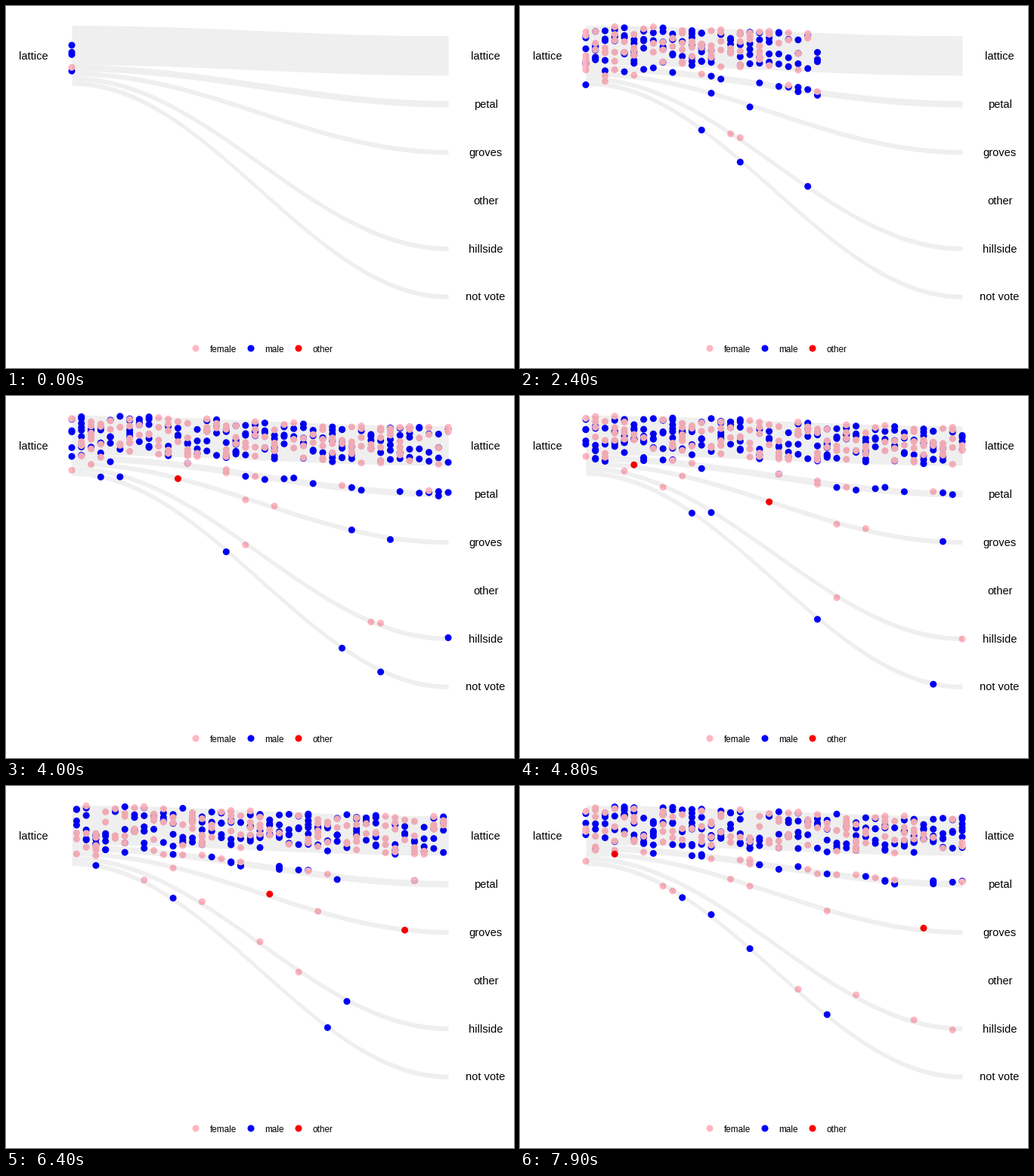
Recreate the animation shown at these times as a matplotlib script. Size 672x480 px, loop 8 s.

```python
import numpy as np
import matplotlib.pyplot as plt
from matplotlib.animation import FuncAnimation

W, H, DPI = 672, 480, 100
FRAMES, INTERVAL = 80, 100
X0, X1, STEPS = 87, 585, 39
PX = 72 / DPI
COLORS = {"m": "#0000ff", "f": "#ffb6c1", "o": "#ff0000"}

# stream: start centre, end centre, height
STREAMS = {
    "lattice": (51.8, 65.8, 52.3),
    "petal": (82.2, 129.7, 8.6),
    "groves": (89.6, 193.6, 6.3),
    "hillside": (96.0, 321.4, 6.3),
    "not vote": (102.4, 385.3, 6.3),
}
LABELS = ["lattice", "petal", "groves", "other", "hillside", "not vote"]

# rare voters: birth step, offset from the stream centre, group
RARE = {
    "groves": [(7, 2.7, "m"), (11, 0, "m"), (19, -2, "f"), (22, 2.4, "f"),
               (29, 0.9, "o"), (38, 0.5, "f"), (43, -2.5, "o"), (53, 1.8, "f"),
               (61, 1.7, "f"), (63, 0.4, "f"), (75, -0.8, "o")],
    "hillside": [(1, -0.9, "m"), (8, -2.9, "f"), (9, 0.8, "f"), (22, 2.4, "f"),
                 (35, 2.2, "m"), (40, 2.4, "f"), (44, -2.3, "f"), (50, -3, "f")],
    "not vote": [(8, 2.5, "m"), (12, 1, "m"), (24, 2.1, "m"), (37, 0.9, "m"),
                 (53, -1.4, "m"), (56, -2.7, "f"), (61, 0.1, "m"), (65, -2.6, "m"),
                 (68, 2.1, "m"), (69, 1.1, "f"), (70, 2.1, "f"), (78, -2.7, "f")],
}
FIRST = {
    "lattice": [(0, 0.2, "m"), (0, 9.6, "m"), (0, 12.6, "m")],
    "petal": [(0, -0.9, "f"), (0, 4, "m")],
}


def ease(u):
    return (1 - np.cos(np.pi * u)) / 2


def make_voters():
    rng = np.random.default_rng(11)
    voters = [(name, *v) for group in (FIRST, RARE)
              for name, vs in group.items() for v in vs]
    for birth in range(1, FRAMES):
        counts = {"lattice": rng.integers(5, 12), "petal": rng.poisson(1)}
        for name, count in counts.items():
            reach = STREAMS[name][2] / 2 - 0.3
            for offset in rng.uniform(-reach, reach, count):
                voters.append((name, birth, offset, rng.choice(["m", "f"], p=[0.58, 0.42])))
    return sorted(voters, key=lambda v: "mfo".index(v[3]))


voters = make_voters()
birth = np.array([v[1] for v in voters])
start = np.array([STREAMS[v[0]][0] + v[2] for v in voters])
drop = np.array([STREAMS[v[0]][1] - STREAMS[v[0]][0] for v in voters])
color = np.array([COLORS[v[3]] for v in voters])

plt.rcParams["font.family"] = "Liberation Sans"
fig = plt.figure(figsize=(W / DPI, H / DPI), dpi=DPI, facecolor="white")
ax = fig.add_axes([0, 0, 1, 1])
ax.set(xlim=(0, W), ylim=(H, 0))
ax.axis("off")

DOT = dict(s=(9 * PX) ** 2, linewidths=0)
dots = ax.scatter([], [], zorder=2, **DOT)

# translucent ribbons lie over the dots
u = np.linspace(0, 1, 200)
for y0, y1, height in STREAMS.values():
    mid = y0 + (y1 - y0) * ease(u)
    ax.fill_between(X0 + (X1 - X0) * u, mid - height / 2, mid + height / 2,
                    color="black", alpha=0.064, linewidth=0, zorder=3)


def label(x, y, text, size=14.65, ha="center"):
    ax.text(x, y, text, size=size * PX, ha=ha, va="baseline", color="black")


label(36.8, 71, LABELS[0])
for i, name in enumerate(LABELS):
    label(634.6, 71 + 63.9 * i, name)

KEY_X = [251, 324, 387]
ax.scatter(KEY_X, [454] * 3, c=[COLORS[k] for k in "fmo"], **DOT)
for x, name in zip(KEY_X, ["female", "male", "other"]):
    label(x + 18.6, 458.8, name, size=11.7, ha="left")


def clock(i):
    """Steps elapsed; the flow slows to half speed for two frames."""
    return min(i, max(63 + (i - 63) / 2, i - 1))


def update(i):
    age = clock(i) - birth
    on = (age >= 0) & (age <= STEPS)
    t = age[on] / STEPS
    x = X0 + (X1 - X0) * t
    y = start[on] + drop[on] * ease(t)
    dots.set_offsets(np.column_stack([x, y]))
    dots.set_facecolor(color[on])
    return dots,


anim = FuncAnimation(fig, update, frames=FRAMES, interval=INTERVAL,
                     repeat=True, repeat_delay=0, blit=False)
plt.show()
```
